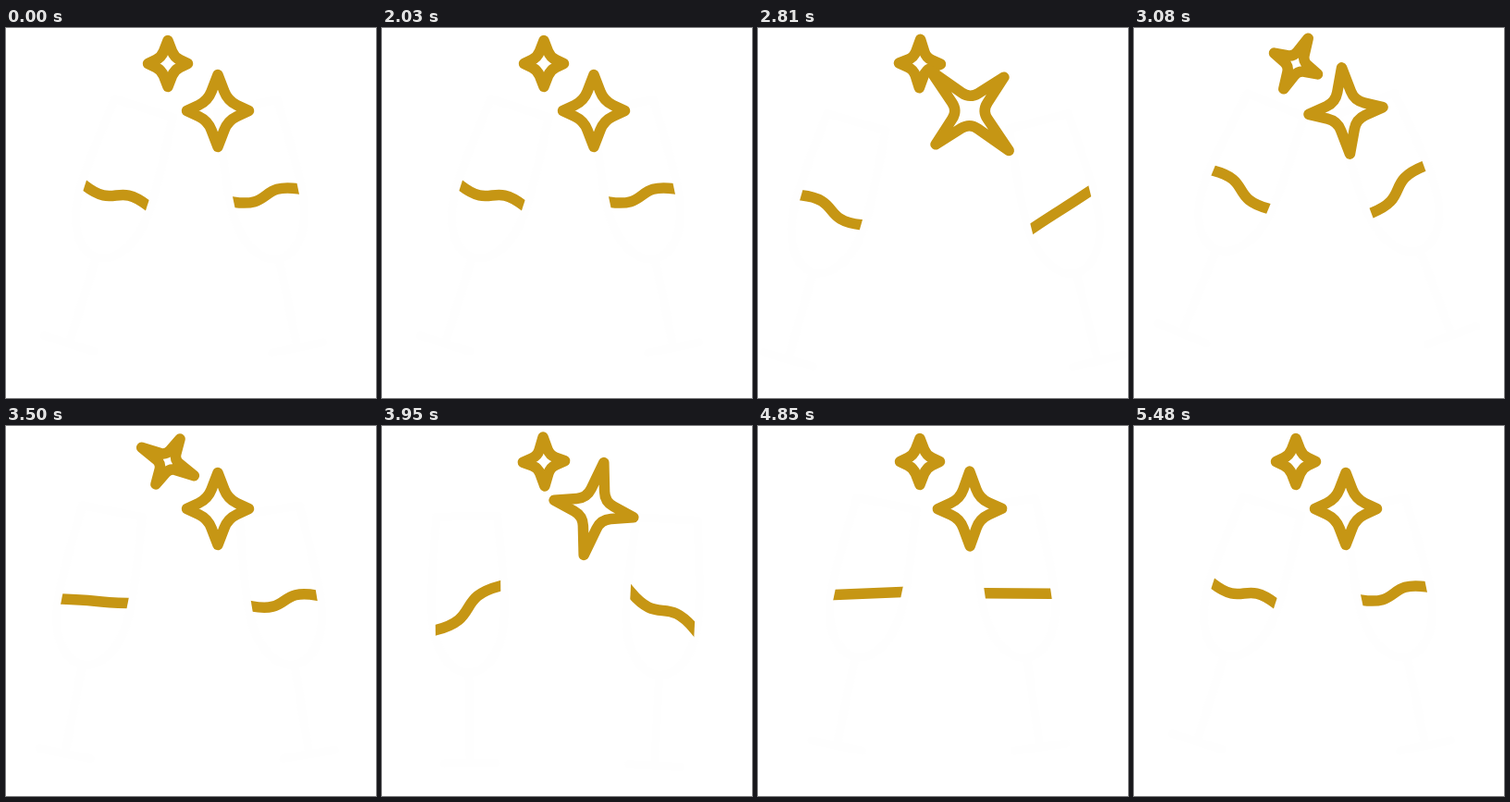
Write an HTML page that moves like this. It is 400 by 400 pixels and loops after 5510 ms.

```html
<!DOCTYPE html>
<html lang="en">
<head>
<meta charset="utf-8">
<title>Toast</title>
<style>
  html, body { margin: 0; width: 100%; height: 100%; overflow: hidden; background: #fff; }
  svg { display: block; width: 100vw; height: 100vh; }
  path { fill: none; stroke-linejoin: round; }
  .gold { stroke: #c69614; stroke-width: 11.5; }
  .glass { stroke: #fefefe; stroke-width: 9; stroke-linecap: round; }
</style>
</head>
<body>
<svg viewBox="0 0 400 400">
  <defs>
    <clipPath id="clipL"><polygon id="wallL"/></clipPath>
    <clipPath id="clipR"><polygon id="wallR"/></clipPath>
  </defs>
  <g>
    <path id="glassL" class="glass"/>
    <g clip-path="url(#clipL)"><path id="waveL" class="gold"/></g>
  </g>
  <g transform="matrix(-1 0 0 1 400 0)">
    <path id="glassR" class="glass"/>
    <g clip-path="url(#clipR)"><path id="waveR" class="gold"/></g>
  </g>
  <path id="small" class="gold"/>
  <path id="big" class="gold"/>
</svg>
<script>
const LOOP = 5510, START = 2030, STEP = 30, SWING = 1140;
const el = id => document.getElementById(id);
const clamp = x => Math.max(0, Math.min(1, x));
const rad = a => a * Math.PI / 180;
const pt = (x, y) => x.toFixed(2) + ',' + y.toFixed(2);
const polar = (r, a) => [r * Math.cos(rad(a)), r * Math.sin(rad(a))];

// turning points of the liquid: slosh angle, drop of the surface, ripple
const times = [2030, 2540, 3090, 3970, 4430, 4850, 5470];
const sides = {
  L: { rest: 17.6, reach: 57, again: 0.65, keys: [
    [0, 0, 1], [1, 0, -1], [17, -8, -1], [-52, 3, 1], [28, 11, -1], [-20, 0, 0], [0, 0, 1]] },
  R: { rest: 11.7, reach: 66, again: 0.48, keys: [
    [0, 0, -1], [13, 0, 1], [30, -8, -1], [-42, 9, -1], [11, 1, 1], [-12, 0, 0], [0, 0, -1]] }
};

function liquid(keys, t) {
  const last = times.length - 1;
  if (t <= times[0] || t >= times[last]) return keys[0];
  let i = 0;
  while (t >= times[i + 1]) i++;
  const u = (t - times[i]) / (times[i + 1] - times[i]);
  const e = (1 - Math.cos(Math.PI * u)) / 2;
  return keys[i].map((a, c) => a + (keys[i + 1][c] - a) * e);
}

// both glasses move apart twice and meet again; the right one is mirrored
function drawGlass(id, t) {
  const { rest, reach, again, keys } = sides[id];
  const [slosh, drop, ripple] = liquid(keys, t);
  const p = clamp((t - START) / (2 * SWING)) * 2;
  const apart = Math.sin(Math.PI * p) ** 2 * (p > 1 ? again : 1);
  const x = 119 - reach * apart, y = 181 + 28 * apart + drop;
  const slope = rest + slosh, tilt = rest + 0.3 * slosh - 6 * apart;

  const half = 35.5 / Math.cos(rad(slope - tilt));
  const [dx, dy] = polar(half, slope);
  const [hx, hy] = polar(1.2 * half, slope + 20 * ripple);
  const x0 = x - dx, y0 = y - dy, x1 = x + dx, y1 = y + dy;
  el('wave' + id).setAttribute('d',
    `M${pt(x0 - hx / 5, y0 - hy / 5)}L${pt(x0, y0)}` +
    `C${pt(x0 + hx, y0 + hy)} ${pt(x1 - hx, y1 - hy)} ${pt(x1, y1)}` +
    `L${pt(x1 + hx / 5, y1 + hy / 5)}`);

  const [wx, wy] = polar(40, tilt - 90);
  el('wall' + id).setAttribute('points', [
    pt(x0 + wx, y0 + wy), pt(x1 + wx, y1 + wy),
    pt(x1 - wx, y1 - wy), pt(x0 - wx, y0 - wy)].join(' '));

  el('glass' + id).setAttribute('transform', `translate(${pt(x, y)}) rotate(${tilt.toFixed(2)})`);
}

// four-pointed star that turns half way round while its tips stretch
function drawStar(id, x, y, tall, wide, waist, p, stretch, pinch) {
  const turn = p < 0.5 ? 2 * p * p : 1 - 2 * (1 - p) * (1 - p);
  const bump = Math.pow(Math.max(0, Math.sin(Math.PI * p)), 1.15);
  const grow = 1 + stretch * bump, k = waist * (1 - pinch * bump);
  const tips = [[0, -tall], [wide, 0], [0, tall], [-wide, 0]].map(([a, b]) => [a * grow, b * grow]);
  const corners = [[k, -k], [k, k], [-k, k], [-k, -k]];
  const toward = ([cx, cy], [tx, ty]) => {
    const f = waist / Math.hypot(tx - cx, ty - cy);
    return pt(cx + (tx - cx) * f, cy + (ty - cy) * f);
  };
  const d = tips.map((tip, i) => {
    const c = corners[i], next = tips[(i + 1) % 4];
    return `${i ? 'L' : 'M'}${pt(...tip)}L${toward(c, tip)}Q${pt(...c)} ${toward(c, next)}`;
  }).join('') + 'Z';
  el(id).setAttribute('d', d);
  el(id).setAttribute('transform', `translate(${x} ${y}) rotate(${(180 * turn).toFixed(2)})`);
}

function draw(time) {
  let t = time % LOOP;
  t = t < START ? 0 : START + Math.floor((t - START) / STEP) * STEP;
  drawGlass('L', t);
  drawGlass('R', t);
  const spin = t < 3500 ? clamp((t - 2045) / 1180) : clamp((t - 3740) / 1140);
  drawStar('big', 229, 89.5, 39, 33.5, 10.8, spin, 0.62, 0.15);
  drawStar('small', 175, 38.5, 25, 21.5, 6.9, clamp((t - 2726) / 1322), 0.3, 0.25);
}

for (const id in sides) {
  el('glass' + id).setAttribute('d',
    'M-33,-99H33C36,-60 42,-10 38,20C34,50 18,70 0,70C-18,70 -34,50 -38,20C-42,-10 -36,-60 -33,-99Z' +
    'M0,70V168M-28,168H28');
}

let begin;
function tick(now) {
  if (begin === undefined) begin = now;
  draw(now - begin);
  requestAnimationFrame(tick);
}
draw(0);
requestAnimationFrame(tick);
</script>
</body>
</html>
```
